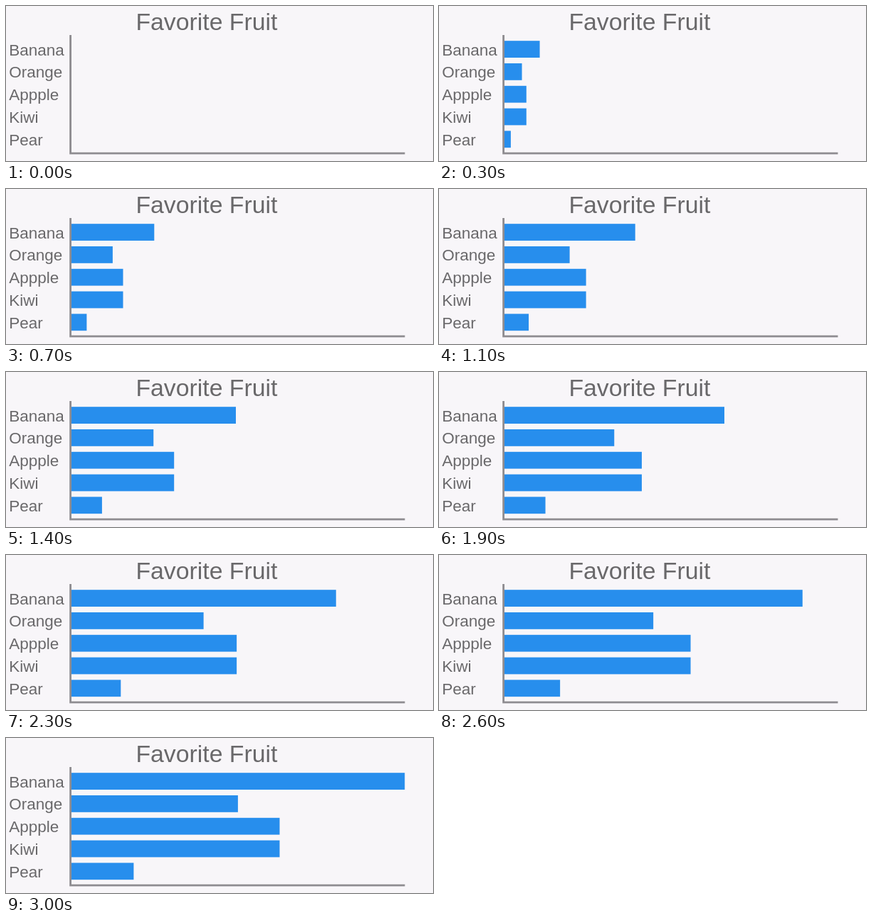
Animation of 600x219 px, one loop 3.4 s. Source, as an HTML page:

```html
<!DOCTYPE html>
<html lang="en">
<head>
<meta charset="utf-8">
<title>Favorite Fruit</title>
<style>
html, body { margin: 0; width: 100%; height: 100%; overflow: hidden; background: #f8f6f9; }
svg { display: block; width: 600px; height: 219px; }
text { font-family: "Liberation Sans", Arial, sans-serif; font-size: 22.5px; font-kerning: none; fill: #69686a; }
.title { font-size: 33.8px; }
.axis { fill: none; stroke: #8e8c90; stroke-width: 2.8; }
rect { fill: #278eed; }
</style>
</head>
<body>
<svg viewBox="0 0 600 219">
  <text class="title" x="182.4" y="34">Favorite Fruit</text>
  <g id="rows"></g>
  <path class="axis" d="M90.6 41V208.2H560.5"/>
</svg>
<script>
const LOOP = 3400, STEP = 100, LEFT = 91.5, ROW = 31.8;
const fruits = [['Banana', 1], ['Orange', 0.5], ['Appple', 0.625], ['Kiwi', 0.625], ['Pear', 0.1875]];
// [time in ms, width of the longest bar]
const growth = [[0, 0], [700, 116.8], [1100, 184.2], [1400, 231.5], [1900, 309.5],
                [2600, 419.3], [2900, 466.5], [3000, 468.8], [LOOP, 468.8]];

function add(tag, attrs, text = '') {
  const el = document.createElementNS('http://www.w3.org/2000/svg', tag);
  for (const key in attrs) el.setAttribute(key, attrs[key]);
  el.textContent = text;
  return document.getElementById('rows').appendChild(el);
}

const bars = fruits.map(([name, share], i) => {
  add('text', { x: 4.2, y: 69.6 + i * ROW }, name);
  return { share, el: add('rect', { x: LEFT, y: 49.2 + i * ROW, width: 0, height: 23.8 }) };
});

function widthAt(t) {
  const i = growth.findIndex(([end]) => end > t);
  const [t0, w0] = growth[i - 1], [t1, w1] = growth[i];
  return w0 + (w1 - w0) * (t - t0) / (t1 - t0);
}

const start = performance.now();
function draw(now) {
  const t = Math.max(0, now - start) % LOOP;
  const width = widthAt(Math.floor(t / STEP) * STEP);
  for (const { share, el } of bars) el.setAttribute('width', width * share);
  requestAnimationFrame(draw);
}
draw(start);
</script>
</body>
</html>
```
